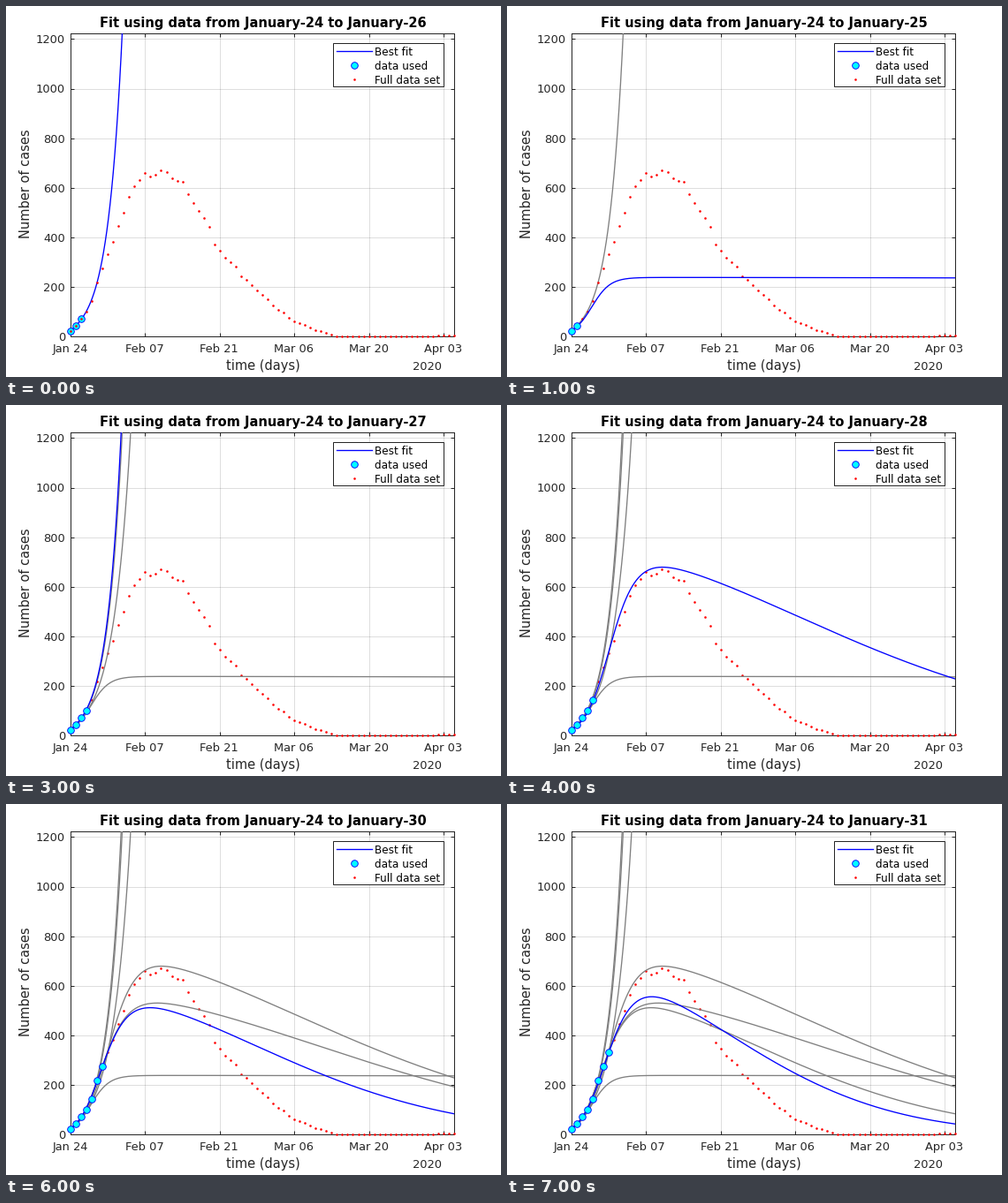
Recreate the animation shown at these times as a matplotlib script. Size 560 by 420 pixels, loop 8000 ms.

```python
import numpy as np
import matplotlib.pyplot as plt
from matplotlib.animation import FuncAnimation
from matplotlib.patches import Rectangle

W, H, DPI = 560, 420, 80
PX = 72 / DPI  # points per pixel
INK = "#262626"
GREY = "#808080"
BLUE = "#0000ff"
plt.rcParams["font.family"] = "DejaVu Sans"

LEFT, RIGHT, TOP, BOTTOM = 73, 507, 31, 374
LAST_DAY, Y_MAX = 72, 1223

# Active cases per day; the remaining days are nearly zero.
CASES = [23, 44, 70, 101, 144, 219, 275, 331, 381, 447, 499, 563, 606, 631,
         661, 646, 652, 670, 664, 640, 627, 624, 574, 538, 506, 478, 442,
         372, 346, 317, 298, 282, 242, 228, 208, 185, 168, 150, 125, 108,
         98, 75, 59, 53, 46, 34, 25, 20, 15, 7]
cases = np.zeros(LAST_DAY + 1)
cases[:len(CASES)] = CASES
cases[-4:] = 2
days = np.arange(LAST_DAY + 1)
t = np.linspace(0, LAST_DAY, 721)


def growth(start, rate, lag):
    """Unchecked exponential growth with a short initial transient."""
    return np.exp(start + rate * t - lag * np.exp(-0.8 * t))


def outbreak(top, shape, rate, mid, a, b=0):
    """Generalised logistic rise times a recovery that speeds up over time."""
    rise = (1 + np.exp(-rate * (t - mid))) ** (-1 / shape)
    return top * rise * np.exp(-a * t**2 + b * t**3)


fits = [
    growth(3.57, 0.365, 0.4),
    outbreak(238, 1, 0.58, 3.8, 1.6e-6),
    growth(3.68, 0.304, 0.5),
    growth(3.575, 0.372, 0.4),
    outbreak(750, 0.7, 0.3763, 6.152, 2.7154e-4, 5.81e-7),
    outbreak(575, 0.5, 0.365, 3.725, 2.3545e-4, 3.31e-7),
    outbreak(580, 0.5, 0.3637, 3.753, 4.227e-4, 6.62e-7),
    outbreak(672, 0.5, 0.334, 4.285, 6.185e-4, 1.162e-6),
]
last_used = [2, 1, 2, 3, 4, 5, 6, 7]

fig = plt.figure(figsize=(W / DPI, H / DPI), dpi=DPI, facecolor="white")
ax = fig.add_axes([LEFT / W, 1 - BOTTOM / H,
                   (RIGHT - LEFT) / W, (BOTTOM - TOP) / H])
ax.set(xlim=(0, LAST_DAY), ylim=(0, Y_MAX),
       xticks=range(0, LAST_DAY, 14), yticks=range(0, 1201, 200))
ax.tick_params(direction="in", top=True, right=True, length=4.3 * PX,
               width=PX, color=INK, labelbottom=False, labelleft=False)
ax.set_axisbelow(True)
ax.grid(color=INK, alpha=0.15, lw=PX)
for spine in ax.spines.values():
    spine.set(color=INK, linewidth=PX)

# Overlay in stage pixels, y pointing down, for text and legend.
page = fig.add_axes([0, 0, 1, 1], zorder=2)
page.set(xlim=(0, W), ylim=(H, 0))
page.axis("off")


def label(x, y, text, size, ha="center", va="baseline", **kw):
    return page.text(x, y, text, fontsize=size * PX, ha=ha, va=va,
                     **{"color": INK, **kw})


TICK, LABEL, KEY = 13, 14.67, 12
title = label(290.5, 24, "", LABEL, color="black", weight="bold")
for i, date in enumerate(["Jan 24", "Feb 07", "Feb 21",
                          "Mar 06", "Mar 20", "Apr 03"]):
    x = LEFT + 14 * i * (RIGHT - LEFT) / LAST_DAY
    label(x - 0.5, 392, date, TICK)
for n in range(0, 1201, 200):
    y = BOTTOM - n * (BOTTOM - TOP) / Y_MAX
    label(67, y + 4.9, str(n), TICK, ha="right")
label(476.5, 411.5, "2020", TICK)
label(290.5, 412, "time (days)", LABEL)
label(23, 201.5, "Number of cases", LABEL, va="center", rotation=90)

curve_style = dict(color=BLUE, lw=1.33 * PX)
used_style = dict(ls="", marker="o", ms=7.6 * PX, mfc="#00ffff", mec=BLUE,
                  mew=0.9 * PX, clip_on=False)
dot_style = dict(ls="", marker="o", ms=2.6 * PX, mfc="red", mec="none",
                 clip_on=False)

page.add_patch(Rectangle((370, 42), 125, 49, fc="white", ec=INK, lw=PX))
page.plot([374, 414], [51, 51], **curve_style)
page.plot([394], [67], **used_style)
page.plot([394], [83], **dot_style)
for y, text in [(56, "Best fit"), (72, "data used"), (88, "Full data set")]:
    label(417, y, text, KEY, ha="left", color="black")

# The first fit lies under the data dots, the later ones over them.
curves = [ax.plot(t, fit, zorder=5 if i else 3, **curve_style)[0]
          for i, fit in enumerate(fits)]
ax.plot(days, cases, zorder=4, **dot_style)
used, = ax.plot([], [], **used_style)


def draw(step):
    end = last_used[step]
    for i, curve in enumerate(curves):
        curve.set_visible(i <= step)
        curve.set_color(BLUE if i == step else GREY)
    used.set_data(days[:end + 1], cases[:end + 1])
    used.set_zorder(6 if step else 3.5)
    title.set_text(f"Fit using data from January-24 to January-{24 + end}")
    return [*curves, used, title]


anim = FuncAnimation(fig, draw, frames=len(fits), interval=1000,
                     init_func=lambda: draw(0), repeat=True, repeat_delay=0)
plt.show()
```
